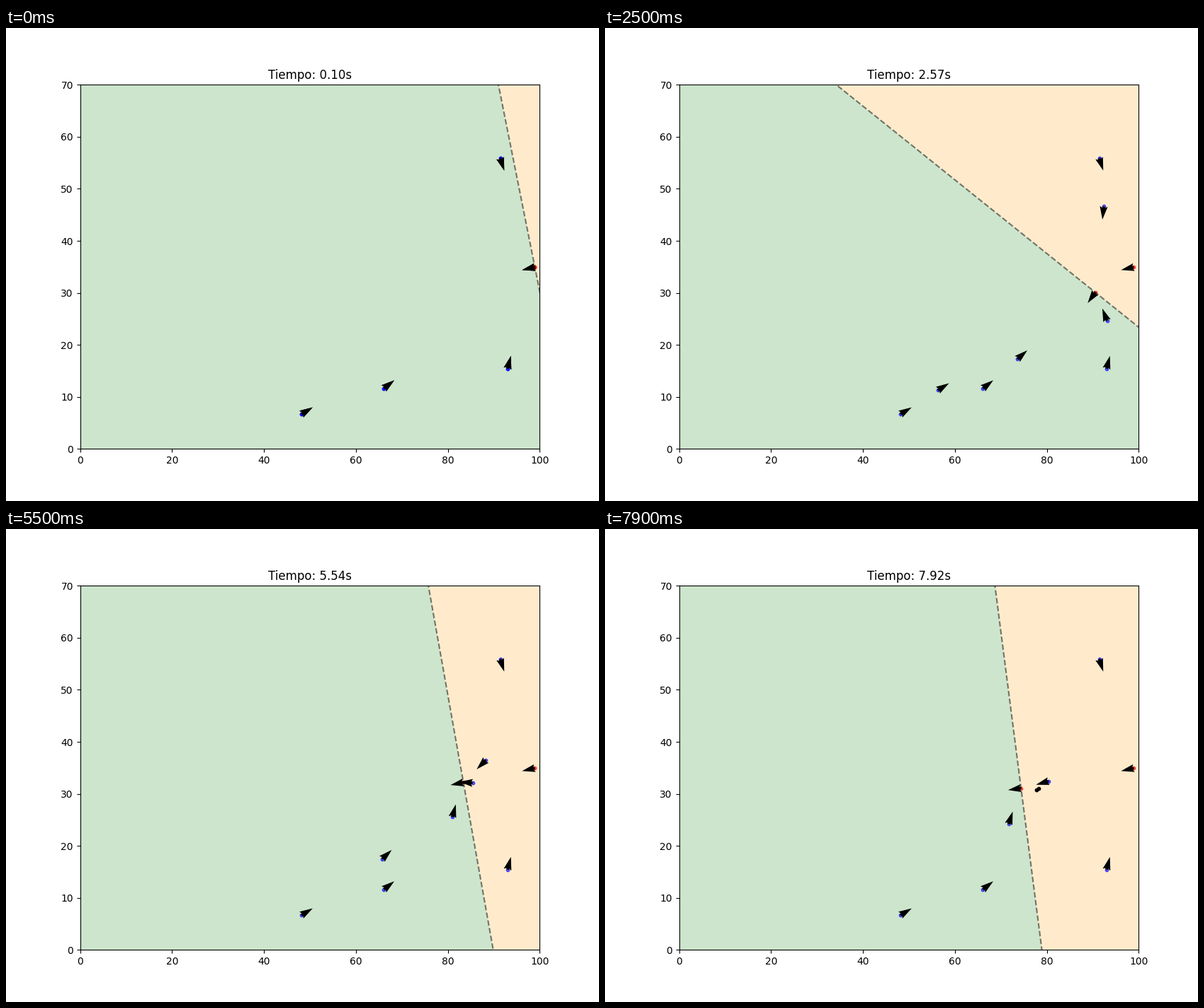
Write a matplotlib script that moves like this. It is 837 px wide and 669 px high and loops after 8000 ms.

```python
import matplotlib.pyplot as plt
import numpy as np
from matplotlib.animation import FuncAnimation

FRAMES, STEP_MS, DT = 80, 100, 0.099
FALL = 74          # two chasers collide and stay down
LENGTH, WIDTH = 100, 70

KEYS = [0, 18, 25, 37, 55, 63]

# x, y, heading in degrees at each key
CHASERS = [
    (KEYS + [FALL], [(93.0, 15.45, 75), (93.8, 22.1, 96), (93.1, 24.65, 111),
                     (90.8, 28.5, 118), (85.4, 32.1, 175), (82.4, 31.6, 204),
                     (78.15, 31.1, 182)]),
    (KEYS + [79], [(91.4, 55.9, 288), (92.55, 49.25, 270), (92.4, 46.6, 264),
                   (91.6, 42.2, 258), (88.3, 36.5, 225), (85.9, 34.65, 218),
                   (80.4, 32.45, 196)]),
    (KEYS + [FALL], [(66.1, 11.65, 38), (71.5, 15.7, 40), (73.6, 17.3, 41),
                     (77.1, 20.2, 48), (81.0, 25.55, 75), (81.2, 28.5, 104),
                     (77.7, 30.8, 165)]),
    (KEYS + [79], [(48.15, 6.7, 31), (54.0, 10.1, 31), (56.3, 11.3, 32),
                   (60.2, 13.6, 33), (65.7, 17.5, 43), (68.0, 19.5, 46),
                   (71.7, 24.2, 72)]),
]

RUN_KEYS = [0, 18, 25, 27, 37, 41, 45, 55, 63, 67, 72, 79]
RUN_PATH = [(98.95, 34.95), (92.5, 32.1), (90.55, 30.1), (90.25, 29.8),
            (89.0, 31.4), (88.8, 32.8), (87.3, 33.0), (83.4, 32.2),
            (80.2, 30.9), (78.85, 31.05), (77.15, 31.5), (74.4, 31.1)]
TURN_KEYS = [0, 18, 25, 26, 27, 37, 39, 41, 43, 45, 55, 63, 65, 67, 69, 72, 79]
TURNS = [192.75, 217, 234.7, 238, 36, 26, 90, 132, 165, 191, 191.4, 228.7,
         175, 157, 160, 186, 188.3]


def glide(keys, points, n):
    """Cubic Hermite curve through the key points."""
    k, p = np.array(keys, float), np.array(points, float)
    n = min(n, k[-1])
    slope = np.gradient(p, k, axis=0)
    i = int(np.clip(np.searchsorted(k, n, "right") - 1, 0, len(k) - 2))
    h = k[i + 1] - k[i]
    u = (n - k[i]) / h
    return ((1 + 2 * u) * (1 - u) ** 2 * p[i] + u * (1 - u) ** 2 * h * slope[i]
            + u * u * (3 - 2 * u) * p[i + 1] + u * u * (u - 1) * h * slope[i + 1])


def unit(deg):
    a = np.radians(deg)
    return np.array([np.cos(a), np.sin(a)])


def runner(n):
    return glide(RUN_KEYS, RUN_PATH, n), unit(np.interp(n, TURN_KEYS, TURNS))


def chaser(i, n):
    x, y, deg = glide(*CHASERS[i], n)
    return np.array([x, y]), unit(deg)


def state(n):
    return [runner(n)] + [chaser(i, n) for i in range(len(CHASERS))]


# the small excess keeps the pixel size from rounding down
fig, ax = plt.subplots(figsize=(8.3701, 6.6901), dpi=100)
ax.set_xlim(0, LENGTH)
ax.set_ylim(0, WIDTH)
ax.set_facecolor("#ffebcc")
title = ax.set_title("")
front, = ax.fill([0, 1, 1], [0, 0, 1], color="#cce5cc", lw=0, zorder=0.5)
border, = ax.plot([], [], "k--", alpha=0.5, lw=1.5)

COLORS = ["red"] + ["blue"] * len(CHASERS)


def draw_agent(pos, head, color):
    dot = ax.scatter(*pos, s=10, color=color, alpha=0.6)
    arrow = ax.quiver(*pos, *head, scale=35, color="black")
    return dot, arrow


for (pos, head), color in zip(state(0), COLORS):
    draw_agent(pos, head, color)
agents = [draw_agent(pos, head, c) for (pos, head), c in zip(state(0), COLORS)]
ax.set_xlim(0, LENGTH)
ax.set_ylim(0, WIDTH)


def update(n):
    now = state(n)
    for i, ((pos, head), (dot, arrow)) in enumerate(zip(now, agents)):
        down = i in (1, 3) and n >= FALL
        dot.set_offsets([pos])
        dot.set_color("black" if down else COLORS[i])
        dot.set_alpha(1 if down else 0.6)
        arrow.set_offsets([pos])
        arrow.set_UVC(*head)
        arrow.set_visible(not down)

    pos, head = now[0]
    side = 150 * np.array([-head[1], head[0]])
    a, b = pos - side, pos + side
    front.set_xy([a, b, b + 150 * head, a + 150 * head])
    border.set_data([a[0], b[0]], [a[1], b[1]])
    title.set_text(f"Tiempo: {(n + 1) * DT:.2f}s")
    return []


anim = FuncAnimation(fig, update, frames=FRAMES, interval=STEP_MS,
                     init_func=lambda: [], repeat=True, repeat_delay=0)
plt.show()
```
